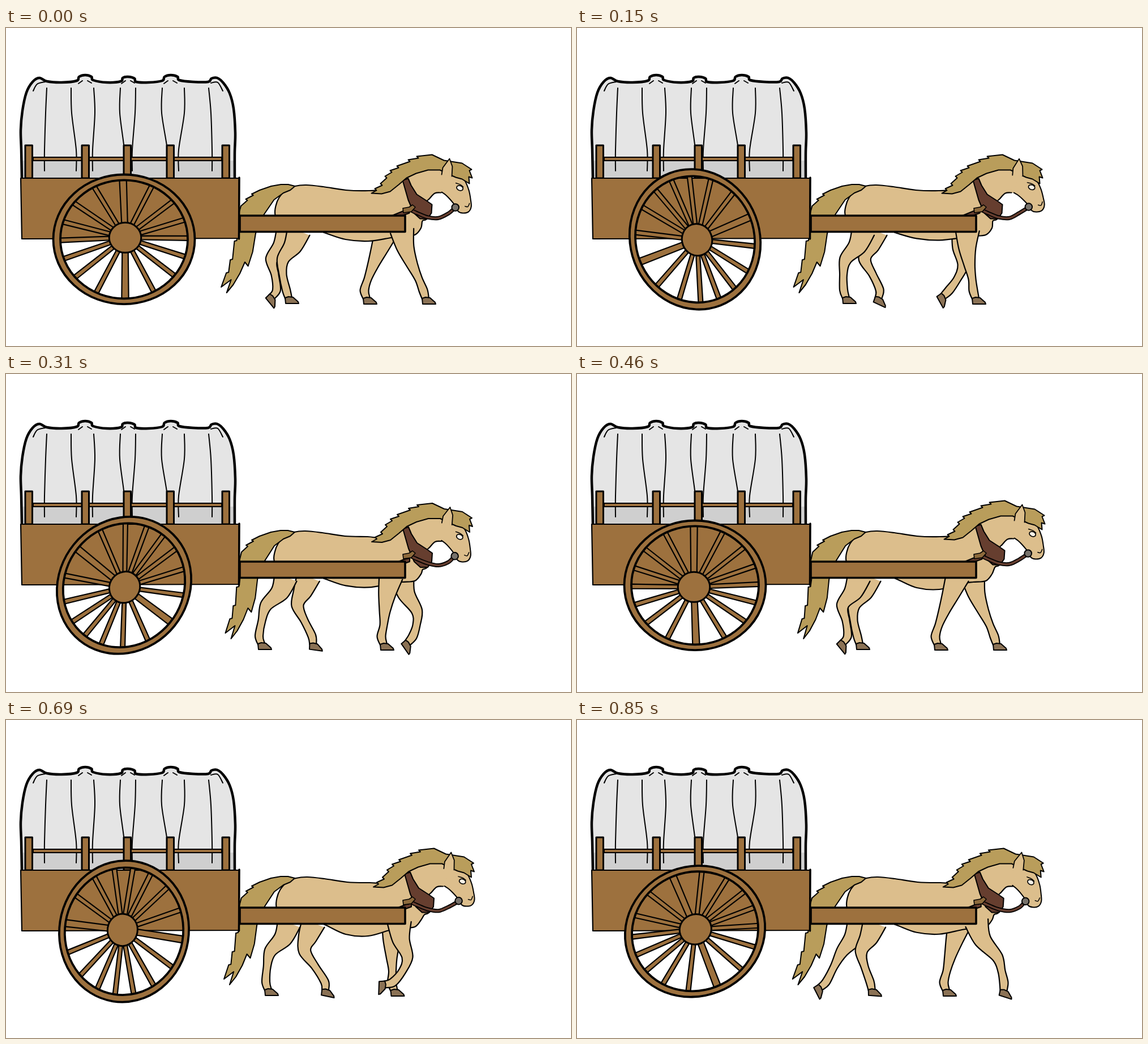
Recreate the animation shown at these times as an HTML page with a canvas. Size 998x561 px, loop 0.93 s.

```html
<!DOCTYPE html>
<html lang="en">
<head>
<meta charset="utf-8">
<title>Wagon</title>
<style>
html, body { margin: 0; width: 100%; height: 100%; overflow: hidden; background: #fff; }
canvas { display: block; }
</style>
</head>
<body>
<canvas id="stage" width="998" height="561"></canvas>
<script>
const ctx = document.getElementById('stage').getContext('2d');
const WOOD = '#9d713e', COAT = '#dcbe8c', HAIR = '#b99d5b', LEATHER = '#663e2f', HOOF = '#8b7255';
const LOOP = 930, COUNT = 12, BEAT = LOOP / COUNT;

// Key poses: step, then x of thigh, knee, cannon and fetlock, then hoof angle
const HIND = {
  y: [358, 386, 409, 435, 462], w: [21, 16, 10.5, 6.5, 7, 6],
  top: x => x + 11,
  keys: [[0, 506, 489, 489, 495, 0], [4, 483, 459, 452, 447, 0], [5, 487, 468, 454, 440, 63],
    [6, 487, 469, 475, 478, 51], [9, 532, 528, 546, 563, 12]]
};
const FORE = {
  y: [358, 389, 419, 443, 463], w: [21, 15, 9.5, 6.5, 7.5, 6],
  top: x => .6 * x + 276,
  keys: [[0, 706, 718, 729, 737, 0], [4, 673, 669, 667, 663, 0], [6, 660, 648, 639, 633, 0],
    [7, 659, 655, 643, 631, 30], [9, 698, 709, 700, 683, 92], [11, 717, 743, 750, 754, 18]]
};

const rad = deg => deg * Math.PI / 180;
const sin = deg => Math.sin(rad(deg)), cos = deg => Math.cos(rad(deg));
const pairs = text => text.trim().split(/\s+/).map(p => p.split(',').map(Number));
const shift = (pts, dx, dy) => pts.map(([x, y]) => [x + dx, y + dy]);

// Each tip is followed by a small notch, for strands of hair
const strands = (text, dx, dy) => pairs(text).flatMap(([x, y]) => [[x, y], [x + dx, y + dy]]);

function polyline(pts) {
  pts.forEach(p => ctx.lineTo(p[0], p[1]));
}

// Rounded curve through all points
function curve(pts) {
  ctx.lineTo(...pts[0]);
  for (let i = 0; i < pts.length - 1; i++) {
    const a = pts[i - 1] || pts[i], b = pts[i], c = pts[i + 1], d = pts[i + 2] || c;
    ctx.bezierCurveTo(b[0] + (c[0] - a[0]) / 6, b[1] + (c[1] - a[1]) / 6,
      c[0] - (d[0] - b[0]) / 6, c[1] - (d[1] - b[1]) / 6, c[0], c[1]);
  }
}

function paint(fill, width) {
  if (fill) { ctx.fillStyle = fill; ctx.fill(); }
  if (width) { ctx.strokeStyle = '#000'; ctx.lineWidth = width; ctx.stroke(); }
}

function shape(pts, fill, width = 2, draw = polyline, closed = true) {
  ctx.beginPath();
  draw(typeof pts === 'string' ? pairs(pts) : pts);
  if (closed) ctx.closePath();
  paint(fill, width);
}

const line = (pts, width = 2) => shape(pts, null, width, curve, false);

function oval(x, y, rx, ry, fill, width, tilt = 0) {
  ctx.beginPath();
  ctx.ellipse(x, y, rx, ry, tilt, 0, 7);
  paint(fill, width);
}

function box(x, y, w, h, width = 3) {
  ctx.beginPath();
  ctx.rect(x, y, w, h);
  paint(WOOD, width);
}

// Sway of the horse: one swing per stride, nods twice per stride
function gait(step) {
  const a = step * 360 / COUNT;
  return {
    rump: .5 - 2 * sin(a),
    belly: 378 - 2 * cos(a) - 3 * sin(a),
    tail: -2 - 5 * cos(a),
    x: 2 - 1.5 * cos(a) - 2 * sin(a),
    y: 2 + 3 * cos(2 * a - 240),
    nod: cos(2 * a) - 1.2 - 3.3 * sin(2 * a)
  };
}

function poseAt(keys, step) {
  const s = step % COUNT;
  const i = keys.findLastIndex(k => k[0] <= s);
  const from = keys[i], to = keys[i + 1] || [COUNT, ...keys[0].slice(1)];
  const k = (s - from[0]) / (to[0] - from[0]);
  return from.map((v, j) => v + (to[j] - v) * k).slice(1);
}

function drawLeg(leg, step) {
  const pose = poseAt(leg.keys, step), angle = pose.pop();
  const fetlock = [pose[3], leg.y[4]], c = cos(angle), s = sin(angle);
  const foot = ([x, y]) => [fetlock[0] + x * c - y * s, fetlock[1] + x * s + y * c];
  const bones = [leg.top(pose[0]), ...pose].map((x, i) => [x, leg.y[i]]);
  bones.push(foot([4, 14]));
  const left = [], right = [];
  bones.forEach(([x, y], i) => {
    const a = bones[i - 1] || bones[i], b = bones[i + 1] || bones[i];
    const len = Math.hypot(b[0] - a[0], b[1] - a[1]);
    const nx = (b[1] - a[1]) / len * leg.w[i], ny = (a[0] - b[0]) / len * leg.w[i];
    left.push([x - nx, y - ny]);
    right.unshift([x + nx, y + ny]);
  });
  ctx.beginPath();
  curve(left);
  curve(right);
  paint(COAT, 2.2);
  shape(pairs('-2,14 4,12 12,13 21,21 22,24 -1,24').map(foot), HOOF);
}

function drawBody({ rump, belly, x, y }) {
  const throat = pairs('768,290 757,291 748,300 741,309 748,325 742,337 735,340');
  const under = [[733, 353], [722, 365], [700, 367], [680, 370], [640, belly], [600, belly - 3],
    [565, 362], [545, 355], [485, 354]];
  const back = pairs('475,330 476,314 482,299 494,286 510,279 530,277 560,280 600,286 640,287');
  const crest = pairs('668,283 700,262 740,246 782,246 795,262 785,292');
  shape([...shift(throat, x, y), ...under, ...shift(back, rump, 0), ...shift(crest, x, y)], COAT, 2.2, curve, false);
}

function drawTail({ tail }) {
  const pts = [...pairs('510,279 498,276 485,276 468,279 448,286'), ...strands('434,293 424,302', 3, 2),
    ...pairs('416,314 412,330 413,362'), ...strands('411,375 405,408 399,431', -4, 1),
    ...pairs('387,457 404,444 397,467 408,453 419,433 427,413 433,420 440,395 444,362 456,331 474,303 490,291 502,286')];
  shape(pts.map(([x, y]) => [x + tail * (y - 290) / 170, y]), HAIR);
}

function drawHarness() {
  shape('700,268 710,265 715,277 725,293 742,304 752,311 751,326 744,336 731,336 720,326 710,303', LEATHER);
  shape('680,331 702,322 712,320 712,326 695,332', LEATHER);
}

function drawFace() {
  shape(`782,248 798,257 809,270 816,287 819,303 820,316 815,325 805,327 797,324
    791,313 782,302 775,295 768,290`, COAT, 2, curve, false);
  oval(800, 283, 5.8, 4.2, '#f8f2e6', 1.7, .4);
  line('793,274 801,277 806,281', 1.5);
  line('809,315 814,316 817,310', 1.5);
}

function drawMane() {
  shape([[645, 291], ...strands('654,286 664,277 672,264 681,254 693,246 713,235 728,229', -3, -3),
    ...pairs(`752,223 773,233 805,238 822,249 818,251 823,264 817,262 818,274 805,266 794,263
    785,259 766,250 745,250 724,256 707,264 693,276 678,288 663,292`)], HAIR);
}

function drawEar() {
  shape('768,259 770,247 782,231 787,245 786,262', COAT, 1.8, polyline, false);
}

// Runs the drawing parts turned around the poll of the head
function inHead({ x, y, nod }, ...parts) {
  ctx.save();
  ctx.translate(784 + x, 249 + y);
  ctx.rotate(rad(nod));
  ctx.translate(-783, -250);
  parts.forEach(part => part());
  ctx.restore();
}

function inNeck({ x, y }, part) {
  ctx.save();
  ctx.translate(x, y);
  part();
  ctx.restore();
}

function drawHorse(step, sway) {
  drawLeg(HIND, step + COUNT / 2);
  drawLeg(FORE, step + COUNT / 2);
  drawBody(sway);
  drawTail(sway);
  drawLeg(HIND, step);
  drawLeg(FORE, step);
  inNeck(sway, drawHarness);
  inHead(sway, drawFace);
  inNeck(sway, drawMane);
  inHead(sway, drawEar);
}

function drawRein({ x, y, nod }) {
  const bx = 784 + x + 9 * cos(nod) - 67 * sin(nod);
  const by = 249 + y + 9 * sin(nod) + 67 * cos(nod);
  line([[712, 320], [727, 327], [745, 334], [764, 335 + y / 2], [781, by + 11], [bx - 2, by + 2]], 7);
  ctx.strokeStyle = LEATHER;
  ctx.lineWidth = 3.5;
  ctx.stroke();
  oval(bx, by, 6.3, 6.3, '#77726b', 2);
  shape('701,318 712,316 718,312 723,316 716,324 702,326', '#8d6a3c', 1.6);
}

function drawCover() {
  const outline = `28,265 27,215 26,180 29,146 36,114 47,95 59,88 72,94 98,96 125,93 129,86 140,83 151,86 154,92
    178,96 203,94 206,88 215,86 227,89 230,95 252,96 276,93 280,86 291,83 303,86 306,92 330,95 357,95 363,89
    373,88 384,97 395,115 402,142 405,185 404,220 404,265`;
  shape(outline, '#e5e5e5', 0, curve);
  ctx.fillStyle = '#cfcfcf';
  ctx.fillRect(29, 234, 374, 31);
  shape(outline, null, 4.5, curve, false);
  // Folds: x, bend and lean
  [[72, -2, -4], [115, 1, 9], [155, 2, -2], [202, -1, 7], [229, -1, -6], [276, -1, 9], [315, 0, -10], [358, 4, 6]]
    .forEach(([x, bend, lean]) => line([[x, 106], [x + bend, 150], [x + lean, 215], [x + lean, 252]]));
  [140, 216, 291].forEach(x => {
    line([[x - 12, 98], [x - 5, 93]]);
    line([[x + 4, 93], [x + 11, 97]]);
  });
  line('48,111 55,99 69,95');
  line('362,97 374,96 383,111');
}

function drawCart() {
  drawCover();
  box(48, 228, 333, 6, 2);
  [34, 134, 208, 284, 382].forEach(x => box(x, 207, 12.5, 58));
  shape('26,265 412,265 411,371 28,372', WOOD, 2.2);
  box(413, 331, 292, 28.5, 3.6);
  line('412,264 411.5,372', 3.5);
}

function drawWheel(step) {
  const hub = [2, -3];
  ctx.save();
  ctx.translate(208.5, 372.8);
  // The wheel lurches ahead except when its heavy spokes stand upright
  ctx.rotate(rad(30 * step + (step % 6 ? 9 : 0)));
  for (let i = 0; i < 16; i++) {
    const a = i * 22.5 + 6.5 * sin(i * 45) - 1, w = i % 8 ? 4 : 6.2;
    const end = [-114 * sin(a), 107 * cos(a)];
    const dx = end[0] - hub[0], dy = end[1] - hub[1], len = Math.hypot(dx, dy);
    const side = ([x, y], half) => [x + dy / len * half, y - dx / len * half];
    shape([side(hub, w * .8), side(end, w), side(end, -w), side(hub, -w * .8)], WOOD, 2.2);
  }
  ctx.beginPath();
  ctx.ellipse(0, 0, 125, 114.3, 0, 0, 2 * Math.PI);
  ctx.moveTo(112.5, 0);
  ctx.ellipse(0, 0, 112.5, 104.5, 0, 0, 2 * Math.PI, true);
  paint(WOOD, 3.8);
  oval(...hub, 28.3, 26.5, WOOD, 3);
  ctx.restore();
}

function frame(now) {
  const step = Math.min(COUNT - 1, Math.floor((now % LOOP + 7.5) / BEAT));
  const sway = gait(step);
  ctx.fillStyle = '#fff';
  ctx.fillRect(0, 0, 998, 561);
  drawHorse(step, sway);
  drawCart();
  drawWheel(step);
  drawRein(sway);
  requestAnimationFrame(frame);
}

ctx.lineJoin = 'round';
ctx.lineCap = 'round';
frame(0);
</script>
</body>
</html>
```
